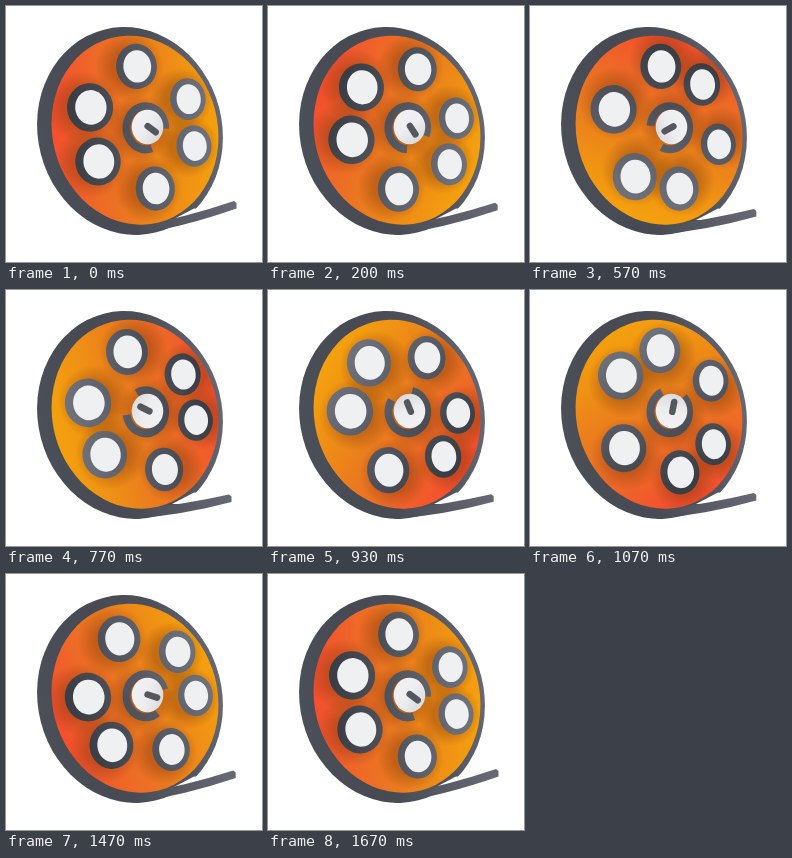
These frames come from a looping animation (256x256 px, 1710 ms). An HTML page with a canvas:

```html
<!DOCTYPE html>
<html lang="en">
<head>
<meta charset="utf-8">
<title>Film reel</title>
<style>
html, body { margin: 0; width: 100%; height: 100%; overflow: hidden; background: #fff; }
canvas { display: block; width: 100vw; height: 100vh; }
</style>
</head>
<body>
<canvas id="stage" width="256" height="256"></canvas>
<script>
const ctx = document.getElementById("stage").getContext("2d");
const LOOP = 1710, STEP = 100 / 3, RAD = Math.PI / 180;
const TILT = -14.5 * RAD, LEAN = -5 * RAD;
const HUB = { x: 140, y: 122.2 };
const HOLES = [81.5, 148.3, 196.8, 261.5, 328.3, 376.8];

// step, turn in degrees, speed in degrees per step
const TURN = [
  [0, 0, 0.4], [11, 56.3, 8.2], [17, 113.5, 9.5], [23, 169.8, 8.9],
  [32, 244, 8.7], [38, 299, 8.1], [50, 360, 0.4]
];

function turnAt(step) {
  let k = 0;
  while (k < TURN.length - 2 && step >= TURN[k + 1][0]) k++;
  const [s0, a0, v0] = TURN[k], [s1, a1, v1] = TURN[k + 1];
  const d = s1 - s0, u = (step - s0) / d, w = 1 - u;
  return a0 * (1 + 2 * u) * w * w + v0 * d * u * w * w +
         a1 * u * u * (3 - 2 * u) - v1 * d * u * u * w;
}

// Reel plane to screen, with the left side nearer.
function project(deg, r = 1) {
  const c = r * Math.cos(deg * RAD), s = r * Math.sin(deg * RAD);
  const w = 1 / (1 + 0.08 * c);
  return { x: HUB.x + (53.5 * c + 1.5 * s) * w, y: HUB.y + (1.5 * c + 61.5 * s) * w, w };
}

function oval(x, y, rx, ry, fill, rot = 0) {
  ctx.beginPath();
  ctx.ellipse(x, y, rx, ry, rot, 0, 2 * Math.PI);
  ctx.fillStyle = fill;
  ctx.fill();
}

function shape(fill, ...points) {
  ctx.beginPath();
  points.forEach(p => p.length > 2 ? ctx.quadraticCurveTo(...p) : ctx.lineTo(...p));
  ctx.fillStyle = fill;
  ctx.fill();
}

function blend(x0, y0, x1, y1, ...colors) {
  const g = ctx.createLinearGradient(x0, y0, x1, y1);
  colors.forEach((c, i) => g.addColorStop(i / (colors.length - 1), c));
  return g;
}

// Gradient that turns with the reel, from its red side to its gold side.
function across(turn, r, ...colors) {
  const a = project(178 + turn, r), b = project(358 + turn, r);
  return blend(a.x, a.y, b.x, b.y, ...colors);
}

function drawTail(turn) {
  const k = Math.sin(turn * RAD / 2), x = 230.5 - 5 * k, dy = 9.5 * k;
  shape(blend(130, 220, 225, 205, "#484c55", "#585b64", "#666973"),
    [135, 219], [178, 212 + dy * 0.25, x - 2.5, 195 + dy],
    [x, 197 + dy], [x, 202.5 + dy], [175, 222 + dy * 0.35, 126, 228.8]);
}

function drawBody(turn) {
  oval(124, 125, 92.1, 104.7,
    blend(31, 140, 217, 110, "#4b4f58", "#474a53", "#4c4f58", "#666973"), TILT);
  // opening between the reel and the loose film
  shape("#fff", [166, 214], [188, 202.5], [215, 205], [190, 214]);
  drawTail(turn);
  oval(129, 124.2, 82.6, 95.3,
    across(turn, 1.5, "#f4502e", "#ee6927", "#ea7b1e", "#ef8f15", "#f4a00e"), TILT);
}

function drawShadow({ x, y, w }, turn) {
  const a = (178 + turn) * RAD, r = 34 * w;
  const sx = x + 7 * Math.cos(a), sy = y + 7 * Math.sin(a);
  const g = ctx.createRadialGradient(sx, sy, r * 0.5, sx, sy, r);
  g.addColorStop(0, "rgba(120,50,10,0.36)");
  g.addColorStop(1, "rgba(120,50,10,0)");
  oval(sx, sy, r, r, g);
}

function drawHole({ x, y, w }, metal) {
  const rx = w ** 1.8;
  oval(x, y, 20 * rx, 22.4 * w, metal, LEAN);
  oval(x + 0.8, y, 13.6 * rx, 16 * w, "#eff0f2", LEAN);
}

function drawHub(turn, metal) {
  const dir = 37 + turn;
  ctx.beginPath();
  ctx.ellipse(139.8, 121.8, 19.3, 21.5, 0, (dir + 35) * RAD, (dir + 325) * RAD);
  ctx.lineWidth = 8;
  ctx.strokeStyle = metal;
  ctx.stroke();

  const c = Math.cos(dir * RAD), s = Math.sin(dir * RAD);
  oval(141.5, 121, 15.8, 17.2,
    blend(141 + 16 * c, 121 + 16 * s, 141 - 16 * c, 121 - 16 * s, "#dcdcde", "#eeeef0", "#f1f1f3"));
  ctx.beginPath();
  ctx.moveTo(142.5 - c, 120.8 - s);
  ctx.lineTo(142.5 + 9 * c, 120.8 + 9 * s);
  ctx.lineCap = "round";
  ctx.lineWidth = 6.5;
  ctx.strokeStyle = "#55575e";
  ctx.stroke();
  ctx.lineCap = "butt";
}

function draw(now) {
  const step = Math.min(50, Math.floor((now % LOOP + 3.4) / STEP));
  const turn = turnAt(step);
  const metal = across(turn, 1.25, "#3b3d44", "#54575f", "#6e717a");
  const holes = HOLES.map(a => project(a + turn));
  ctx.fillStyle = "#fff";
  ctx.fillRect(0, 0, 256, 256);
  drawBody(turn);
  // keep the soft shadows on the face
  ctx.save();
  ctx.beginPath();
  ctx.ellipse(129, 124.2, 82.6, 95.3, TILT, 0, 2 * Math.PI);
  ctx.clip();
  [...holes, { ...HUB, w: 1 }].forEach(h => drawShadow(h, turn));
  ctx.restore();
  holes.forEach(h => drawHole(h, metal));
  drawHub(turn, metal);
}

let start;
function tick(now) {
  start ??= now;
  draw(Math.max(0, now - start));
  requestAnimationFrame(tick);
}
draw(0);
requestAnimationFrame(tick);
</script>
</body>
</html>
```
